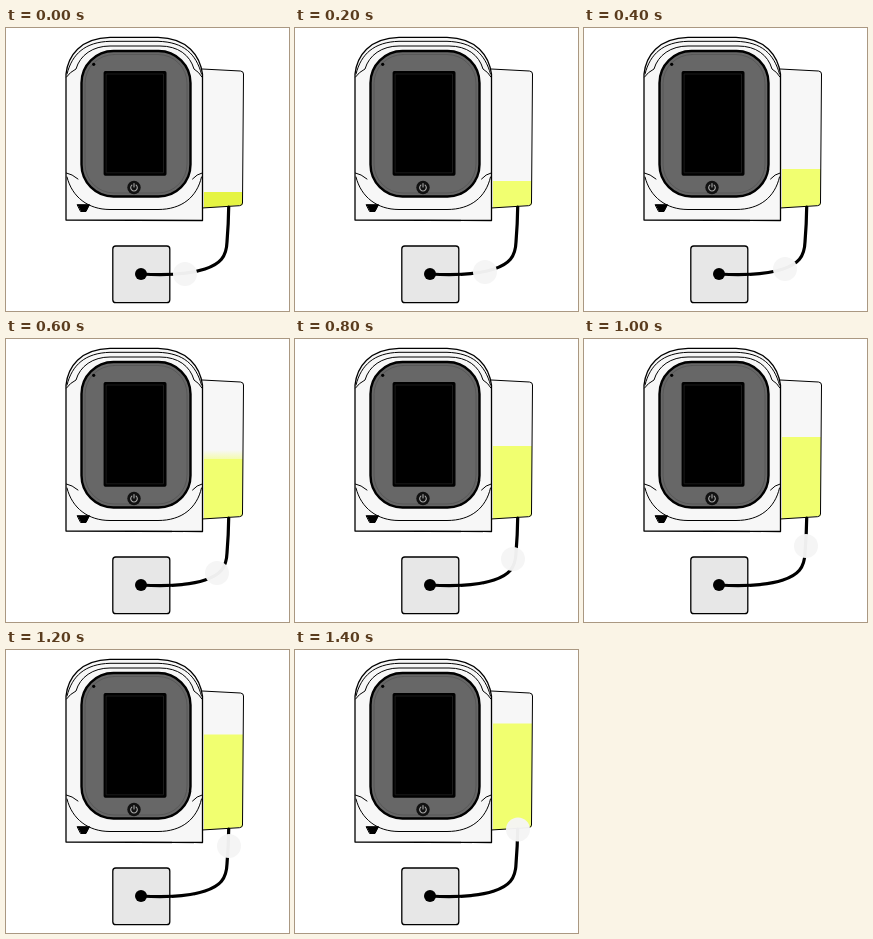
An HTML page that plays this animation: 283x283 px, repeating every 2400 ms.

```html
<!DOCTYPE html>
<html lang="en">
<head>
<meta charset="utf-8">
<title>Filling pouch</title>
<style>
  html, body { margin: 0; width: 100%; height: 100%; overflow: hidden; background: #fff; }
  svg { display: block; width: 100vw; height: 100vh; }
</style>
</head>
<body>
<svg viewBox="0 0 283 283" fill="none" stroke="#000" stroke-linecap="round" stroke-linejoin="round">
  <defs>
    <clipPath id="pouchShape"><path d="M196.5 41 L237.5 44 L236.5 177 L196.5 180Z"/></clipPath>
    <linearGradient id="soft" x2="0" y2="1">
      <stop stop-color="#f1ff70" stop-opacity="0"/>
      <stop offset="1" stop-color="#f1ff70" stop-opacity=".6"/>
    </linearGradient>
  </defs>

  <!-- pouch -->
  <path d="M196 41 L234.5 43 Q237.5 43.3 237.5 46 L236.5 175 Q236.3 177.5 233.5 177.7 L196 180Z" fill="#f7f7f7" stroke="none"/>
  <g clip-path="url(#pouchShape)" stroke="none">
    <rect id="foam" x="198" width="39" height="10" fill="url(#soft)"/>
    <rect id="liquid" x="198" width="39"/>
  </g>
  <path d="M196 41 L234.5 43 Q237.5 43.3 237.5 46 L236.5 175 Q236.3 177.5 233.5 177.7 L196 180"/>

  <!-- pad and tube -->
  <rect x="106.8" y="218" width="57" height="56.7" rx="3" fill="#e7e7e7" stroke-width="1.3"/>
  <path d="M135 246 C162 247.5 184 246 199 241 C214 236 220.5 229 221 214 Q222.5 196 222.7 179" stroke-width="3.2"/>
  <circle cx="135" cy="246" r="6" fill="#000" stroke="none"/>

  <!-- housing -->
  <path d="M60 192 V46 C62 28 74 10 104 9.3 H152 C182 10 194 28 196.5 46 V192.5Z" fill="#f7f7f7" stroke-width="1.3"/>
  <path d="M61 46 C66 26 79 14 104 13.3 H152 C178 14 190 26 195.5 46"/>
  <path d="M60.5 49 Q64 44 70 41 C74 27 87 18 104 18 H154 C172 18 184 27 188 41 Q193 44 196 49"/>
  <path d="M60.5 145 Q66 146 72 151 M196 145 Q191 146 186.5 151"/>
  <path d="M61 149 C66 169 82 181.5 104 181.5 H152 C176 181.5 191 169 195.5 149"/>
  <rect x="75.5" y="23" width="109" height="145.5" rx="32" fill="#676767" stroke-width="2.4"/>
  <rect x="79" y="26.5" width="102" height="138.5" rx="29" stroke="#555" stroke-width=".8"/>
  <rect x="98.3" y="43.8" width="61.5" height="103.2" rx="1" fill="#000" stroke-width="1.4"/>
  <rect x="100.5" y="46" width="57" height="98.8" stroke="#222" stroke-width=".8"/>
  <circle cx="87.7" cy="36.3" r="1.6" fill="#000" stroke="none"/>
  <circle cx="128" cy="159.5" r="6.7" fill="#111" stroke="none"/>
  <path d="M125.9 157.1 A3.3 3.3 0 1 0 130.1 157.1 M128 155.6 V159" stroke="#aaa" stroke-width="1.1"/>
  <path d="M71.5 176.7 H83.5 L80 183.5 H75Z" fill="#000"/>

  <circle id="bubble" r="12" fill="#f5f5f5" fill-opacity=".97" stroke="none"/>
</svg>
<script>
  const LOOP = 2400, STEP = 200;
  // liquid level, then bubble position for each step
  const poses = [
    [164, 179, 246], [153, 190, 244], [141, 201, 241], [120, 211, 234],
    [107, 218, 220], [98, 222, 207], [84.5, 223, 196], [73.5, 223, 179.5]
  ];
  const byId = id => document.getElementById(id);
  const set = (node, attrs) => {
    for (const key in attrs) node.setAttribute(key, attrs[key]);
  };
  const liquid = byId("liquid"), foam = byId("foam"), bubble = byId("bubble");

  function draw(time) {
    const step = Math.min(Math.floor(time % LOOP / STEP), poses.length - 1);
    const [level, cx, cy] = poses[step];
    set(liquid, { y: level, height: 181 - level, fill: step === 0 ? "#e5f443" : "#f1ff70" });
    set(foam, { y: level - 9, visibility: step === 3 ? "visible" : "hidden" });
    set(bubble, { cx, cy });
  }

  const start = performance.now();
  function tick() {
    draw(performance.now() - start);
    requestAnimationFrame(tick);
  }
  tick();
</script>
</body>
</html>
```
